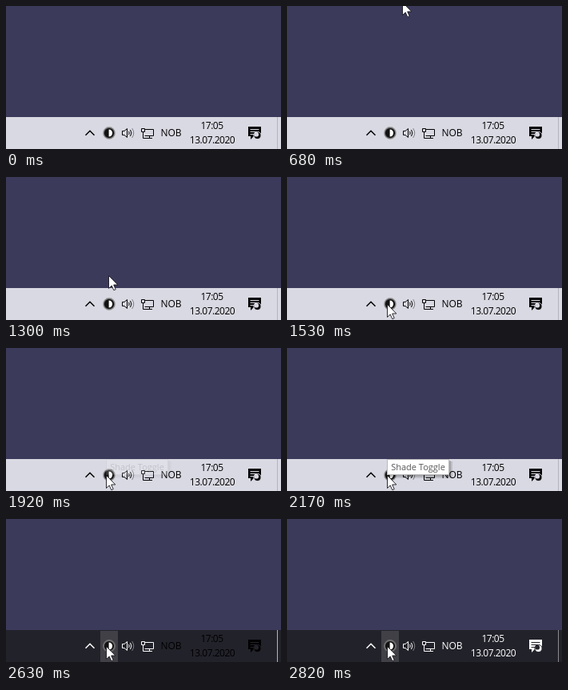
Recreate the animation shown at these times as an HTML page. Size 344 by 179 pixels, loop 4.03 s.

```html
<!DOCTYPE html>
<html lang="en">
<head>
<meta charset="utf-8">
<title>Taskbar theme toggle</title>
<style>
  html, body { margin: 0; width: 100%; height: 100%; overflow: hidden; background: #3c3a5b; }
  svg { display: block; --bar: #d9d9e3; --hover: #e9e9ef; --icon: #000; --text: #000; --edge: #b4b4bf; }
  svg.dark { --bar: #22222b; --hover: #404046; --icon: #fff; }
  svg.settled { --text: #fff; --edge: #8a8a90; }
  text { font: 12px "Open Sans", "Noto Sans", sans-serif; fill: var(--text); text-anchor: middle; }
  .clock { letter-spacing: -.5px; }
  .line { fill: none; stroke: var(--icon); }
</style>
</head>
<body>
<svg id="stage" width="344" height="179" viewBox="0 0 344 179">
  <rect width="344" height="179" fill="#3c3a5b"/>
  <rect y="139" width="344" height="40" fill="var(--bar)"/>
  <rect id="hover" x="118" y="140" width="22" height="39" fill="var(--hover)"/>

  <path class="line" stroke-width="1.5" d="M99.5 161.7L105 156.2L110.5 161.7"/>

  <g id="contrast">
    <circle cx="129" cy="159" r="7" fill="#111" stroke="#888" stroke-opacity=".75" stroke-width="1.8"/>
    <path d="M128.6 154.5A4.5 4.5 0 0 1 128.6 163.5Z" fill="#fff"/>
  </g>

  <g class="line">
    <path d="M145.5 156.5H148L151.5 153.5V164.5L148 161.5H145.5Z"/>
    <path d="M153.5 157Q155 159 153.5 161M155.5 155Q158.3 159 155.5 163"/>
    <path opacity=".4" d="M157.7 153Q161.8 159 157.7 165"/>
  </g>

  <g class="line">
    <path d="M174 154.5H184.5V162.5H173.5M179.5 163V165.5M175 165.5H183"/>
    <path d="M169.5 153.5H173.5V157.5H169.5ZM171.5 157.5V165.5H175"/>
  </g>

  <text x="206.5" y="163">NOB</text>
  <text class="clock" x="257.5" y="154">17:05</text>
  <text class="clock" x="258" y="172">13.07.2020</text>

  <path fill="var(--text)" d="M303 151H319V163H310L306 167V163H303Z"/>
  <path stroke="var(--bar)" d="M305.5 154.5H316.5M305.5 157.5H314M305.5 160.5H310"/>
  <circle cx="314.5" cy="162" r="4.6" fill="var(--text)" stroke="var(--bar)"/>
  <circle cx="313.2" cy="160.7" r="2.9" fill="var(--bar)"/>
  <path stroke="var(--edge)" d="M339.5 139V179"/>

  <g id="tip">
    <rect x="128" y="142" width="79" height="21" fill="#000" opacity=".12"/>
    <rect x="127" y="141" width="78" height="20" fill="#000" opacity=".15"/>
    <rect x="125.5" y="139.5" width="77" height="19" fill="#fff" stroke="#b8b8b8"/>
    <text x="164" y="153" style="fill:#575757;font-size:11px">Shade Toggle</text>
  </g>

  <circle id="click" cx="126" cy="159" r="12" fill="#f0e834" opacity=".7"/>
  <path id="cursor" fill="#fff" stroke="#16161c" stroke-width=".9" stroke-linejoin="round"
    d="M.5 .5V16.5L4.2 13L6.8 18.7L9.2 17.7L6.7 12H11.8Z"/>
</svg>
<script>
const LOOP = 4030;
const el = id => document.getElementById(id);
const show = (id, on) => el(id).setAttribute("visibility", on ? "visible" : "hidden");

const moves = [680, 750, 830, 900, 980, 1060, 1140, 1220, 1300, 1380, 1460, 1530];
const fades = [[1920, .17], [2000, .45], [2090, .75], [2170, 1]];
// Cursor path: time, x, y
const path = [[680, 144, -5], [980, 141, 56], [1140, 131, 93], [1300, 128, 123], [1530, 125, 159]];

function cursorAt(time) {
  const i = Math.max(1, path.findIndex(p => p[0] >= time));
  const [t0, x0, y0] = path[i - 1], [t1, x1, y1] = path[i];
  const k = (time - t0) / (t1 - t0);
  return [x0 + (x1 - x0) * k, y0 + (y1 - y0) * k].map(Math.round);
}

function draw(t) {
  const moved = moves.findLast(m => m <= t);
  show("cursor", moved);
  if (moved) el("cursor").setAttribute("transform", `translate(${cursorAt(moved)})`);

  const fade = fades.findLast(f => f[0] <= t);
  el("tip").setAttribute("opacity", fade && t < 2470 ? fade[1] : 0);

  show("hover", t >= 2470);
  show("click", t >= 2470 && t < 2630);
  el("stage").classList.toggle("dark", t >= 2630);
  el("stage").classList.toggle("settled", t >= 2820);
}

const start = performance.now();
function tick() {
  draw((performance.now() - start) % LOOP);
  requestAnimationFrame(tick);
}
tick();
</script>
</body>
</html>
```
